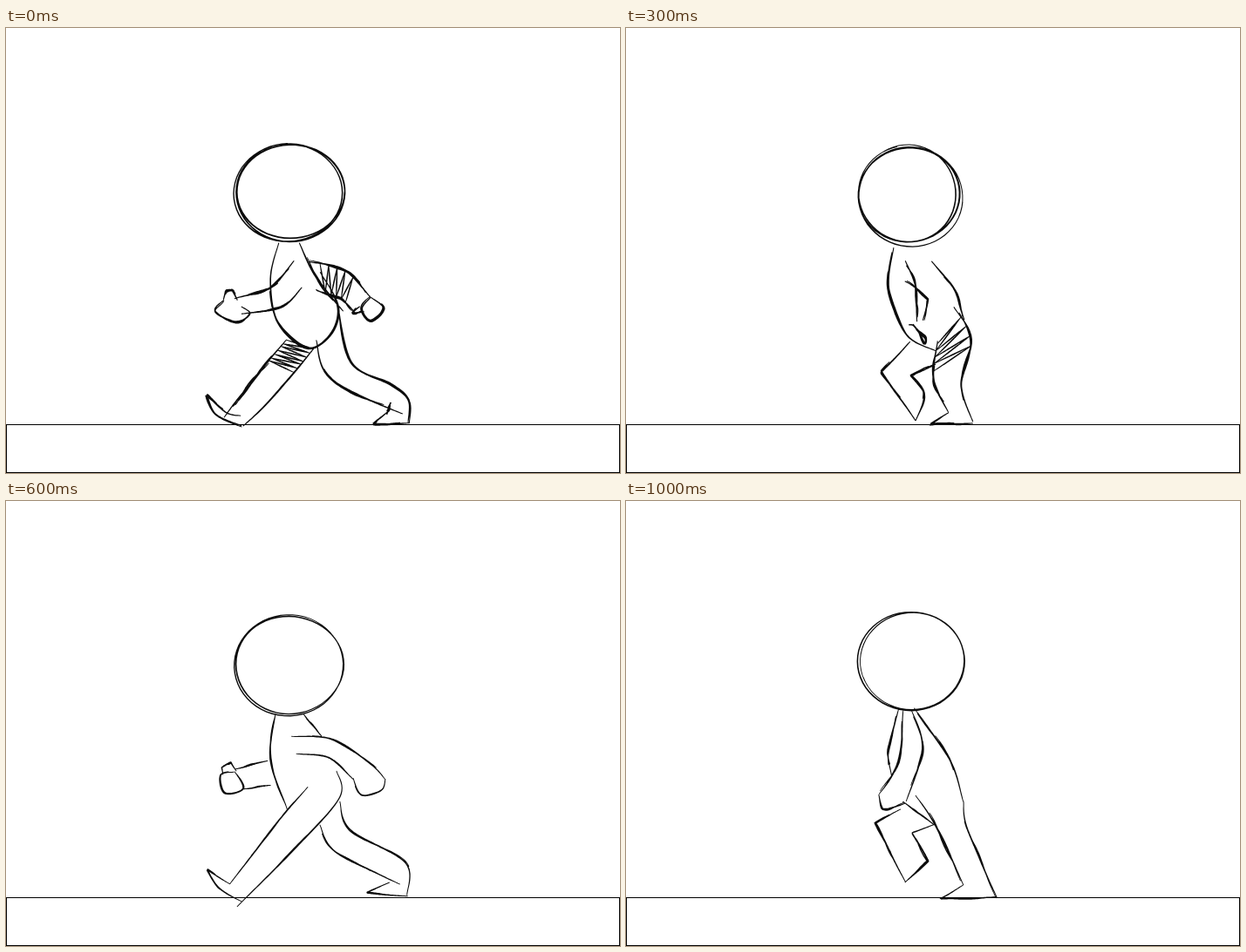
Write an HTML page that moves like this. It is 704 by 511 pixels and loops after 1100 ms.

```html
<!DOCTYPE html>
<html lang="en">
<head>
<meta charset="utf-8">
<title>Walk cycle</title>
<style>
html, body { margin: 0; width: 100%; height: 100%; overflow: hidden; background: #fff; }
svg { display: block; width: 704px; height: 511px; }
.pose { visibility: hidden; fill: #0c0c0c; animation: show 1100ms step-end infinite; }
@keyframes show {
  0% { visibility: visible; }
  9.091%, 100% { visibility: hidden; }
}
</style>
</head>
<body>
<svg id="stage" viewBox="0 0 704 511">
  <rect x=".5" y="455.5" width="703" height="55" fill="#fff" stroke="#000"/>
</svg>
<script>
const COUNT = 60; // samples per stroke
const ROUND = ['chest', 'back', 'arm', 'fist', 'farFist'];
const ARMS = ['arm', 'fist', 'farArm', 'farFist', 'thumb'];

let seed = 7;
const random = () => (seed = (seed * 16807) % 2147483647) / 2147483647;
const spread = r => (random() * 2 - 1) * r;
const mix = (a, b, t) => a.map((v, k) => v + (b[k] - v) * t);
const dist = (a, b) => Math.hypot(b[0] - a[0], b[1] - a[1]);

// Points spaced evenly along a line.
function even(line) {
  const at = [0];
  for (let i = 1; i < line.length; i++) at.push(at[i - 1] + dist(line[i - 1], line[i]));
  let j = 1;
  return Array.from({ length: COUNT }, (_, i) => {
    const s = at.at(-1) * i / (COUNT - 1);
    while (j < line.length - 1 && at[j] < s) j++;
    return mix(line[j - 1], line[j], (s - at[j - 1]) / (at[j] - at[j - 1]));
  });
}

// Curve through key points; turns over 60 degrees stay sharp unless round.
function trace(text, round) {
  const p = text.split(' ').map(q => q.split(',').map(Number));
  const slope = p.map((v, i) => {
    const a = p[i - 1] || v, b = p[i + 1] || v;
    const dot = (v[0] - a[0]) * (b[0] - v[0]) + (v[1] - a[1]) * (b[1] - v[1]);
    const sharp = a !== v && b !== v && dot < .5 * dist(a, v) * dist(v, b);
    return sharp && !round ? [0, 0] : [(b[0] - a[0]) / 2, (b[1] - a[1]) / 2];
  });
  const line = [p[0]];
  for (let i = 1; i < p.length; i++) {
    for (let t = .1; t < 1.01; t += .1) {
      const u = 1 - t;
      line.push([0, 1].map(k =>
        p[i - 1][k] * u * u * (1 + 2 * t) + slope[i - 1][k] * t * u * u +
        p[i][k] * t * t * (1 + 2 * u) - slope[i][k] * t * t * u));
    }
  }
  return even(line);
}

function pose(head, parts) {
  const out = { head };
  for (const name in parts) {
    out[name] = parts[name].map(text => trace(text, ROUND.includes(name)));
  }
  return out;
}

// Halfway drawing of the parts both poses have.
function between(a, b) {
  const out = { head: mix(a.head, b.head, .5) };
  for (const name in a) {
    if (name === 'head' || !b[name]) continue;
    out[name] = a[name].slice(0, b[name].length).map((line, i) =>
      line.map((p, k) => mix(p, b[name][i][k], .5)));
  }
  return out;
}

// One pose with the head and arms of another.
function withArms(body, other) {
  const out = { ...body, head: other.head };
  for (const name of ARMS) out[name] = other[name] || [];
  return out;
}

const contactFar = pose([326, 188, 62, 54], {
  chest: ['313,247 303,288 311,337 345,368 373,352 381,320 360,280'],
  back: ['336,247 358,290 387,325'],
  arm: ['330,267 305,297 262,311', '339,298 315,321 270,328'],
  fist: ['250,312 240,325 262,338 280,328 270,320'],
  thumb: ['249,312 252,302 260,301 265,313'],
  farArm: ['347,268 388,278 418,309', '356,301 385,312 400,327'],
  farFist: ['418,309 433,322 418,336 408,322 418,309', '406,320 397,327 411,326'],
  lead: ['321,358 275,415 250,447', '354,367 305,425 272,457'],
  leadFoot: ['269,445 252,441 230,421 240,443 270,457'],
  trail: ['356,358 373,404 455,443', '381,320 396,384 440,409 462,428 462,454'],
  trailFoot: ['440,438 421,455 462,454', '441,430 437,444']
});

const passing = pose([326, 200, 57, 54], {
  chest: ['314,240 300,280 298,345', '331,263 351,315 325,365 300,425'],
  back: ['337,265 350,290 385,334'],
  arm: ['318,266 329,300 317,342'],
  fist: ['298,348 317,337 336,352 315,364 298,348'],
  farArm: ['338,264 360,272 396,295 387,338'],
  lead: ['315,385 300,425 327,449', '336,412 347,440 352,454'],
  leadFoot: ['335,453 305,448 297,456 352,455'],
  trail: ['313,397 360,416 380,443', '390,340 370,373 350,384 381,403 380,443'],
  trailFoot: ['382,402 383,420 379,445']
});

const push = pose([323, 183, 59, 54], {
  chest: ['311,230 302,275 310,333 319,349'],
  back: ['305,250 318,237 340,254 365,288 389,328 385,356'],
  arm: ['323,268 338,303 350,333', '349,270 374,318 367,345'],
  fist: ['350,333 343,354 366,361 372,345'],
  farArm: ['302,318 294,334', '308,356 317,352'],
  farFist: ['300,327 288,341 303,357'],
  lead: ['344,333 285,373 300,398 321,428', '385,356 327,381 341,415'],
  leadFoot: ['321,428 317,441 341,415'],
  trail: ['352,373 378,428 386,440', '386,352 398,385 421,454'],
  trailFoot: ['386,441 360,454 425,454']
});

const contactNear = pose([325, 188, 62, 56], {
  chest: ['309,245 303,295 322,354'],
  back: ['341,245 362,270'],
  arm: ['327,270 375,274 418,302 435,320', '333,290 370,295 399,320'],
  fist: ['398,318 408,338 430,332 435,319'],
  farArm: ['263,308 300,298', '272,331 304,326'],
  farFist: ['262,311 246,315 251,335 272,330 262,311'],
  thumb: ['249,314 247,306 258,300 264,310'],
  lead: ['346,328 300,383 257,440', '379,310 383,340 335,395 265,466'],
  leadFoot: ['257,440 230,423 244,444 270,460'],
  trail: ['360,372 378,403 452,440', '383,345 395,378 458,415 460,453'],
  trailFoot: ['440,438 413,450 461,454']
});

const down = pose([323, 193, 60, 60], {
  chest: ['309,250 301,320 315,358'],
  back: ['341,248 358,273'],
  arm: ['342,271 365,276 400,300 417,328', '334,291 368,303 387,342'],
  fist: ['417,328 413,344 400,349 387,343'],
  farArm: ['287,343 301,340', '295,360 315,357'],
  farFist: ['280,334 265,352 278,367 297,362 290,340'],
  thumb: ['274,338 280,332 287,343'],
  lead: ['345,344 305,370 292,400 303,440', '384,340 365,378 321,404 330,408 333,437 317,452'],
  leadFoot: ['303,440 288,456 320,453'],
  trail: ['353,391 364,427 405,411', '380,362 382,390 412,388 430,407'],
  trailFoot: ['430,405 429,417 409,411']
});

const rise = pose([326, 190, 62, 58], {
  chest: ['307,252 301,300 322,352 355,371'],
  back: ['350,268 375,298 388,335'],
  arm: ['318,257 340,305 320,343', '333,252 368,300 354,352'],
  fist: ['320,343 340,362 358,345'],
  lead: ['326,360 293,395 332,451', '355,386 327,399 342,420 332,451'],
  trail: ['357,359 353,405 370,442', '376,320 396,358 384,410 398,452'],
  trailFoot: ['370,442 349,455 398,454']
});

const pushFar = pose([327, 184, 61, 56], {
  chest: ['313,238 301,285 304,315', '317,345 354,372'],
  back: ['330,238 370,295 387,345'],
  arm: ['318,240 312,300 290,337', '327,240 340,285 321,345'],
  fist: ['290,337 295,354 320,347'],
  lead: ['315,354 286,370 320,437', '354,371 328,381 346,413 320,438'],
  trail: ['332,338 354,371 387,441', '387,345 392,378 425,455'],
  trailFoot: ['387,441 360,457 425,455']
});

// hatch: part -> [start, end, lines]
const bold = { weight: 2.1, passes: 3, rough: 1.2, rings: 3, loose: 3 };
const scribble = { ...bold, weight: 2.3, rings: 6, loose: 6 };
const clean = { weight: 1.8, passes: 2, rough: .8, rings: 2, loose: 1.5 };
const cycle = [
  [contactFar, bold, { farArm: [.15, .7, 9], lead: [0, .3, 13] }],
  [withArms(down, between(contactFar, passing)), bold, { lead: [0, .3, 9] }],
  [passing, scribble],
  [withArms(rise, between(passing, push)), bold, { trail: [.05, .4, 8] }],
  [push, { ...bold, rings: 2 }, { trail: [0, .35, 7] }],
  [between(push, contactNear), clean],
  [contactNear, clean],
  [down, clean],
  [withArms(passing, between(down, rise)), clean],
  [rise, clean],
  [pushFar, { ...clean, passes: 3, rough: 1.1 }]
];

// Outline of a pen line that thins at both ends.
function ink(line, width) {
  const sides = [[], []];
  line.forEach(([x, y], i) => {
    const a = line[Math.max(i - 1, 0)], b = line[Math.min(i + 1, line.length - 1)];
    const len = dist(a, b) || 1;
    const h = width / 2 * (.5 + .5 * Math.sin(Math.PI * i / (line.length - 1)));
    const nx = (a[1] - b[1]) / len * h, ny = (b[0] - a[0]) / len * h;
    sides[0].push([x + nx, y + ny]);
    sides[1].unshift([x - nx, y - ny]);
  });
  return 'M' + sides.flat().map(p => p.map(v => v.toFixed(1))).join('L') + 'Z';
}

function wobble(line, size) {
  const a = random() * 6, b = random() * 6, f = .1 + random() * .1;
  return line.map(([x, y], i) => [x + size * Math.sin(i * f + a), y + size * Math.sin(i * f + b)]);
}

// A firm line, then lighter passes over parts of it.
function sketch(line, { weight, passes, rough }) {
  let d = ink(wobble(line, .3), weight);
  for (let i = 1; i < passes; i++) {
    const from = Math.floor(random() * COUNT * .4);
    const to = Math.ceil(COUNT * (1 - random() * .4));
    d += ink(wobble(line.slice(from, to), rough), weight * .75);
  }
  return d;
}

function drawHead([cx, cy, rx, ry], { weight, rings, loose }) {
  let d = '';
  for (let n = 0; n < rings; n++) {
    const r = n ? loose : 0, start = random() * 6.28;
    const x = cx + spread(r), y = cy + spread(r);
    const w = rx + spread(r), h = ry + spread(r);
    const ring = Array.from({ length: COUNT }, (_, i) => {
      const a = start + i / (COUNT - 1) * 6.6;
      return [x + w * Math.cos(a), y + h * Math.sin(a)];
    });
    d += ink(wobble(ring, .6), weight * (n ? .8 : .95));
  }
  return d;
}

function drawHatch([a, b], [from, to, lines]) {
  const at = n => (n % 2 ? b : a)[Math.round((from + (to - from) * n / lines) * (COUNT - 1))];
  let d = '';
  for (let n = 0; n < lines; n++) d += ink(even([at(n), at(n + 1)]), 1.6);
  return d;
}

const stage = document.getElementById('stage');
cycle.forEach(([body, style, hatch = {}], i) => {
  let d = drawHead(body.head, style);
  for (const name in body) {
    if (name !== 'head') d += body[name].map(line => sketch(line, style)).join('');
  }
  for (const name in hatch) d += drawHatch(body[name], hatch[name]);

  const path = document.createElementNS('http://www.w3.org/2000/svg', 'path');
  path.setAttribute('class', 'pose');
  path.setAttribute('d', d);
  path.style.animationDelay = (i - cycle.length) * 100 + 'ms';
  stage.append(path);
});
</script>
</body>
</html>
```
